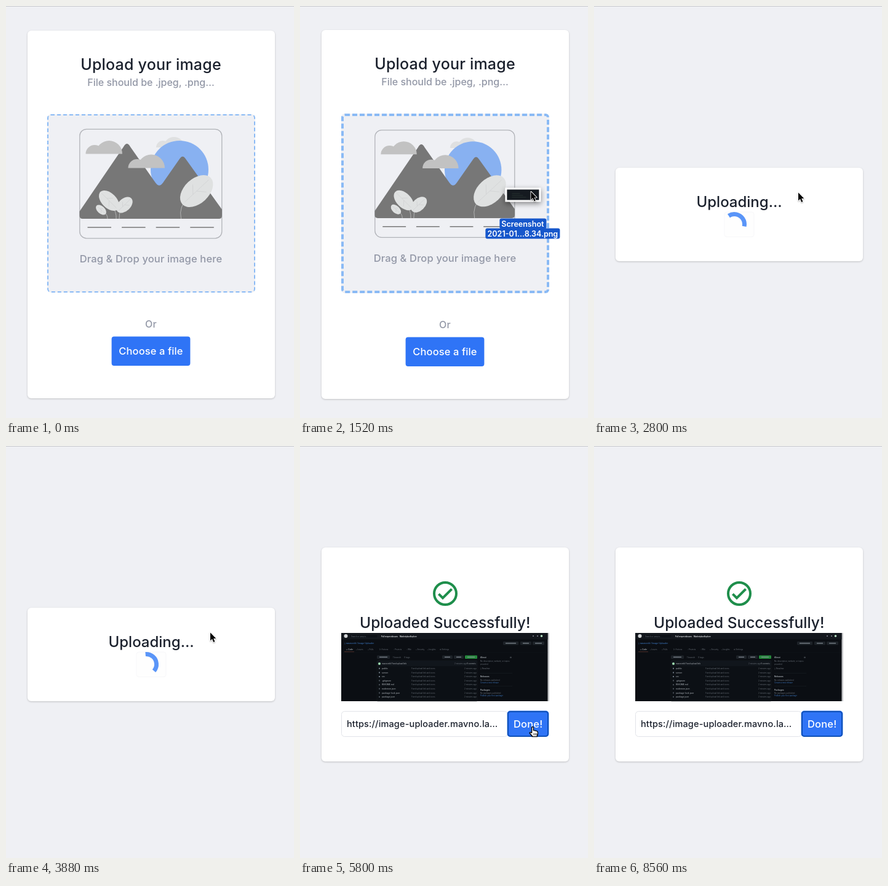
Animation, 468 px wide and 670 px high, one loop 8.64 s. Source, as an HTML page with a canvas:

```html
<!DOCTYPE html>
<html lang="en">
<head>
<meta charset="utf-8">
<title>Image uploader</title>
<style>
html, body { margin: 0; width: 100%; height: 100%; overflow: hidden; background: #fff; }
canvas { display: block; position: relative; width: 468px; height: 670px; }
#zone {
  position: absolute; left: 67px; width: 338px; box-sizing: border-box;
  border: 2px dashed #8abaf5; border-radius: 6px; background: #eff0f4;
}
</style>
</head>
<body>
<div id="zone"></div>
<canvas id="stage"></canvas>
<script>
const W = 468, H = 670, LOOP = 8640;
const DROP = 2240, UPLOADING = 2320, UPLOADED = 3960, COPIED = 5600, CURSOR_OFF = 7400;
const BG = '#eff0f4', INK = '#1b212d', MUTED = '#9297a6', BLUE = '#2f74f6';
const FONT = 'Inter, "Open Sans", sans-serif';

const zone = document.getElementById('zone');
const canvas = document.getElementById('stage');
const ctx = canvas.getContext('2d');
const ratio = window.devicePixelRatio || 1;
canvas.width = W * ratio;
canvas.height = H * ratio;

function text(str, x, y, size, color, { weight = 500, space = 0, align = 'center' } = {}) {
  ctx.font = `${weight} ${size}px ${FONT}`;
  ctx.letterSpacing = space + 'px';
  ctx.textAlign = align;
  ctx.fillStyle = color;
  ctx.fillText(str, x, y);
}

function box(x, y, w, h, r, fill, stroke, width = 1) {
  ctx.beginPath();
  ctx.roundRect(x, y, w, h, r);
  if (fill) { ctx.fillStyle = fill; ctx.fill(); }
  if (stroke) { ctx.strokeStyle = stroke; ctx.lineWidth = width; ctx.stroke(); }
}

function shadow(color, blur, dy) {
  ctx.shadowColor = color;
  ctx.shadowBlur = blur * ratio;
  ctx.shadowOffsetY = dy * ratio;
}

function withShadow(color, blur, dy, draw) {
  ctx.save();
  shadow(color, blur, dy);
  draw();
  ctx.restore();
}

function card(top, bottom) {
  withShadow('rgba(0,0,0,.2)', 3, 1, () => box(35, top, 402, bottom - top, 6, '#fff'));
}

function disc(x, y, r, color) {
  ctx.beginPath();
  ctx.arc(x, y, r, 0, 7);
  ctx.fillStyle = color;
  ctx.fill();
}

function line(d, color, width) {
  ctx.strokeStyle = color;
  ctx.lineWidth = width;
  ctx.stroke(new Path2D(d));
}

// Illustration

function cloud(x, base, left, right, gap, color) {
  ctx.beginPath();
  ctx.arc(x, base, left, Math.PI, 0);
  ctx.arc(x + gap, base, right, Math.PI, 0);
  ctx.closePath();
  ctx.fillStyle = color;
  ctx.fill();
}

function leaf(x, y, long, short, degrees) {
  ctx.save();
  ctx.translate(x, y);
  ctx.rotate(degrees * Math.PI / 180);
  ctx.beginPath();
  ctx.ellipse(0, 0, long, short, 0, 0, 7);
  ctx.fillStyle = '#dfe1e1';
  ctx.fill();
  const a = long * .85, b = short * .6;
  line(`M${-a} 0H${a}M${-a * .3} 0L${a * .1} ${-b}M0 0L${a * .4} ${b}`, '#cfd1d2', .7);
  ctx.restore();
}

function illustration() {
  box(119.8, 200.3, 231, 177.5, 11, null, '#b1b3b8', 1.3);
  cloud(255, 230, 11, 17, 18, '#dfe0e1');
  disc(282, 266, 47, '#88b1f1');
  ctx.fillStyle = '#777';
  ctx.fill(new Path2D('M119.5 334L191 229Q196.500 219 202 229L243 287.500Q249 296 255 287.500' +
    'L282.500 248Q287 241.500 291.500 248L351 331V341Q351 346 346 346H124.500Q119.500 346 119.500 341Z'));
  cloud(144, 240.500, 14.500, 21.500, 23.500, '#c2c2c2');
  cloud(213, 263.500, 14.500, 22, 23, '#c2c2c2');
  line('M284.500 346Q280 325 297 312M179 346Q180 335 172 325M184 346Q183 338 188 330M165 346Q165 338 158 335', '#c3c5c5', .8);
  leaf(309.700, 301, 31.500, 20, -43);
  leaf(167.500, 316.500, 20, 12, 45);
  leaf(192.500, 323.500, 15.500, 10, -44);
  leaf(154.500, 331.500, 10, 6, 42);
  for (let i = 0; i < 4; i++) line(`M${132.500 + i * 55.600} 360h38.500`, '#777', 1.500);
}

// Upload form

// The dashed area is a real element, seen through a hole in the canvas.
function dropZone(top, height, border) {
  zone.style.top = top + 'px';
  zone.style.height = height + 'px';
  zone.style.borderWidth = border + 'px';
  ctx.clearRect(67, top, 338, height);
}

function form(cursorX) {
  const onImage = cursorX < 351;
  const inZone = !onImage && cursorX < 405;
  const grow = onImage || inZone ? 1 : 0;
  const imageBorder = onImage ? 4 : inZone ? 2 : 0;
  const top = 40 - grow;

  card(top, 638 + grow);
  text('Upload your image', 235.500, top + 64, 25, INK, { space: .2 });
  text('File should be .jpeg, .png…', 235.500, top + 89.500, 16, MUTED);
  dropZone(top + 136, 290 + 2 * grow, inZone ? 4 : 2);

  ctx.save();
  if (onImage) {
    box(121, 199, 229, 180, 0, null, '#e2e4e9', 4);
    ctx.globalAlpha = .88;
  }
  const scale = (232 - 2 * imageBorder) / 232;
  ctx.translate(235.250, 289);
  ctx.scale(scale, scale);
  ctx.translate(-235.250, -289);
  illustration();
  ctx.restore();

  const labelY = 417 + (onImage ? 1 : -grow);
  text('Drag & Drop your image here', 235.500, labelY, 16.500, MUTED, { space: .15 });
  text('Or', 235.500, 523 + grow, 16, MUTED, { space: .2 });
  box(171.600, 537.600 + grow, 127.800, 47.400, 4, BLUE);
  text('Choose a file', 235.500, 567 + grow, 16.500, '#fff', { space: .1 });
}

function draggedFile(x, y) {
  withShadow('rgba(0,0,0,.45)', 8, 3, () => box(x, y, 58, 23, 0, '#fff'));
  box(x + 3, y + 3, 52, 17, 0, '#151a20');
  for (let i = 0; i < 3; i++) box(x + 11, y + 9 + i * 3, 13 + i * 5, 1, 0, '#25302f');
  box(x - 9, y + 50, 76, 17, 3, '#1657cb');
  box(x - 32, y + 66, 121, 17, 3, '#1657cb');
  text('Screenshot', x + 28.500, y + 63, 12.500, '#fff', { weight: 600 });
  text('2021-01…8.34.png', x + 28.500, y + 79, 12.500, '#fff', { weight: 600 });
}

// Progress

function uploading(t) {
  card(263, 415);
  text('Uploading…', 236, 327, 24, INK);
  box(212, 335, 48, 40.500, 4, '#fefefe', '#f7f7f9');
  const start = (t - 2800) / 1000 * 2 * Math.PI - 2.160;
  ctx.beginPath();
  ctx.arc(228, 355, 16.500, start, start + 2.360);
  ctx.strokeStyle = '#5a95f8';
  ctx.lineWidth = 7;
  ctx.stroke();
}

// Result

function tiny(str, x, y, color = '#858c94', weight = 400, size = 3.300) {
  text(str, x, y, size, color, { weight, align: 'left' });
}

function tinyButton(x, y, w, fill = '#1d2228') {
  box(x, y, w, 5.500, 1, fill);
  box(x + 4, y + 2.200, w - 8, 1.200, 0, '#858d96');
}

function screenshot(top) {
  const soft = '#666d75', plain = '#9da3a9', link = '#3a72b8';
  ctx.save();
  ctx.translate(67, top);
  box(0, 0, 338, 111, 0, '#c8c9cb');
  box(0, 0, 335.500, 111, 0, '#0b0e13');
  box(0, 0, 335.500, 10.500, 0, '#13171d');
  disc(7.500, 5, 3, '#d4d6d8');
  box(14, 2.500, 45, 5.500, 1, '#0d1117', '#22272e', .4);
  tiny('Search or jump to…', 16, 6.500, soft, 400, 2.900);
  ['Pull requests', 'Issues', 'Marketplace', 'Explore'].forEach((s, i) =>
    tiny(s, [65, 83, 95, 112][i], 6.500, '#d0d3d6', 700, 2.900));
  disc(312, 5, 1, '#889');
  disc(319, 5, 1, '#889');
  disc(325.500, 5, 1.800, '#b9e8c5');

  tiny('▯ mavnoreld / Image-Uploader', 5, 18, link, 500);
  tinyButton(263, 14, 25);
  tinyButton(291, 14, 18);
  tinyButton(311, 14, 19);
  ['‹› Code', '◦ Issues', '◦ Pulls', '▷ Actions', '▫ Projects', '▫ Wiki', '◦ Security', '◦ Insights', '⚙ Settings'].forEach((s, i) =>
    tiny(s, [8, 24, 43, 62, 85, 106, 121, 140, 160][i], 27.500, i ? soft : plain, i ? 400 : 700, 3));
  box(5, 30.500, 16, .6, 0, '#7d4536');
  box(0, 31.200, 335.500, .4, 0, '#171b21');

  tinyButton(58, 36.500, 21);
  tiny('1 branch', 84, 40.500, soft);
  tiny('0 tags', 102, 40.500, soft);
  tinyButton(164, 36.500, 17);
  tinyButton(183, 36.500, 16);
  tinyButton(201, 36.500, 20, '#258a3c');

  box(58, 45, 163, 66, 1, '#0c1015', '#181c22', .5);
  box(58, 45, 163, 9, 1, '#11161c');
  disc(62, 50, 2, '#9fe0b1');
  tiny('mavnoreld Fixed upload link', 66, 51, plain, 500, 3);
  tiny('2 minutes ago', 184, 51, soft, 400, 3);
  tiny('9 commits', 204, 51, plain, 400, 3);
  ['public', 'server', 'src', '.gitignore', 'README.md', 'nodemon.json', 'package-lock.json', 'package.json'].forEach((s, i) => {
    const y = 59 + i * 6.600;
    box(61, y - 2.200, 2, 2, 0, i < 3 ? '#6d7782' : '#4b525a');
    tiny(s, 66, y, plain, 500);
    tiny('Fixed upload link and icons', 114, y, soft, 400, 3);
    tiny('2 minutes ago', 200, y, soft, 400, 3);
  });

  tiny('About', 226, 40.500, plain, 700);
  tiny('⚙', 274, 40.500);
  tiny('No description, website, or topics', 226, 47, soft, 400, 3);
  tiny('provided.', 226, 51.500, soft, 400, 3);
  tiny('▯ Readme', 226, 59, soft);
  ['Releases', 'Packages'].forEach((s, i) => {
    const y = 72 + i * 21.500;
    box(226, y - 7, 52, .4, 0, '#1b2026');
    tiny(s, 226, y, plain, 700);
    tiny(`No ${s.toLowerCase()} published`, 226, y + 5.800, soft, 400, 3);
    tiny(i ? 'Publish your first package' : 'Create a new release', 226, y + 9.500, link, 400, 3);
  });
  ctx.restore();
}

function checkIcon(y) {
  ctx.save();
  ctx.translate(236, y);
  ctx.beginPath();
  ctx.arc(0, 0, 18, 0, 7);
  ctx.strokeStyle = '#1e8e4b';
  ctx.lineWidth = 4;
  ctx.stroke();
  line('M-10.600 .6L-4 7.200L10.600 -7.400', '#1e8e4b', 4);
  ctx.restore();
}

function result(copied) {
  const top = copied ? 165 : 153;
  const rowH = copied ? 42 : 66;
  const row = top + 266;
  card(top, row + rowH + 40);
  checkIcon(top + 75);
  text('Uploaded Successfully!', 235.700, top + 131, 24.500, INK);
  screenshot(top + 139);

  box(67.500, row + .5, 270, rowH - 1, 5, '#fff', '#e2e4e9');
  text('https://image-uploader.mavno.la…', 76, 457, 14.500, INK, { space: .15, align: 'left' });

  box(336.600, row - .4, 67.800, rowH + .4, 5, BLUE);
  if (copied) {
    box(338, row + 1, 65, rowH - 2, 4, null, '#0e50b8', 2);
    text('Done!', 370.700, 457.500, 16.500, '#fff', { space: .2 });
  } else {
    text('Copy', 370.700, 446, 16.500, '#fff', { space: .3 });
    text('Link', 370.700, 469.500, 16, '#fff');
  }
}

// Pointer

const PATH = [
  [960, 560, 298], [1200, 420, 301], [1400, 385, 302], [1520, 375.500, 302],
  [1760, 345, 303], [1960, 332, 303.500], [4840, 332, 303.500], [5400, 378, 456.500]
];
const ARROW = new Path2D('M0 0V13L3 10.200L5.200 15.500L7.400 14.600L5.200 9.400H9.200Z');
const HAND = new Path2D('M-1.300 1.200Q0 -.8 1.400 1.200V6L6.500 7Q9 8 8.200 11.500L7 16H0L-4.800 10.200Q-4 8 -1.300 10Z');

function pointerAt(t) {
  const next = PATH.findIndex(p => p[0] > t);
  if (next < 0) return PATH[PATH.length - 1].slice(1);
  if (next === 0) return PATH[0].slice(1);
  const [t0, x0, y0] = PATH[next - 1], [t1, x1, y1] = PATH[next];
  let k = (t - t0) / (t1 - t0);
  if (t0 > UPLOADED) k = k * k * (3 - 2 * k);
  return [x0 + (x1 - x0) * k, y0 + (y1 - y0) * k];
}

function pointer(x, y, hand) {
  const shape = hand ? HAND : ARROW;
  ctx.save();
  ctx.translate(x, y);
  ctx.lineJoin = 'round';
  ctx.lineWidth = hand ? 1.200 : 1.800;
  ctx.strokeStyle = hand ? '#000' : '#fff';
  ctx.fillStyle = hand ? '#fff' : '#000';
  shadow('rgba(0,0,0,.3)', 2, 1);
  ctx.stroke(shape);
  shadow('transparent', 0, 0);
  ctx.fill(shape);
  if (hand) {
    ctx.stroke(shape);
    line('M2 10.500V14M4.200 10.500V14M6.200 10.500V14', '#000', .8);
  }
  ctx.restore();
}

function draw(t) {
  ctx.setTransform(ratio, 0, 0, ratio, 0, 0);
  box(0, 0, W, H, 0, BG);
  box(0, 0, W, 1, 0, '#c9cace');

  const [x, y] = pointerAt(t);
  if (t < UPLOADING) form(x);
  else if (t < UPLOADED) uploading(t);
  else result(t >= COPIED);

  if (t >= PATH[0][0] && t < DROP) {
    const [dragX, dragY] = pointerAt(t - 50);
    draggedFile(dragX - 46, dragY - 6.500);
  }
  if (t >= PATH[0][0] && t < CURSOR_OFF) pointer(x, y, t >= UPLOADED && y > 419);
}

function tick() {
  draw(performance.now() % LOOP);
  requestAnimationFrame(tick);
}
tick();
</script>
</body>
</html>
```
